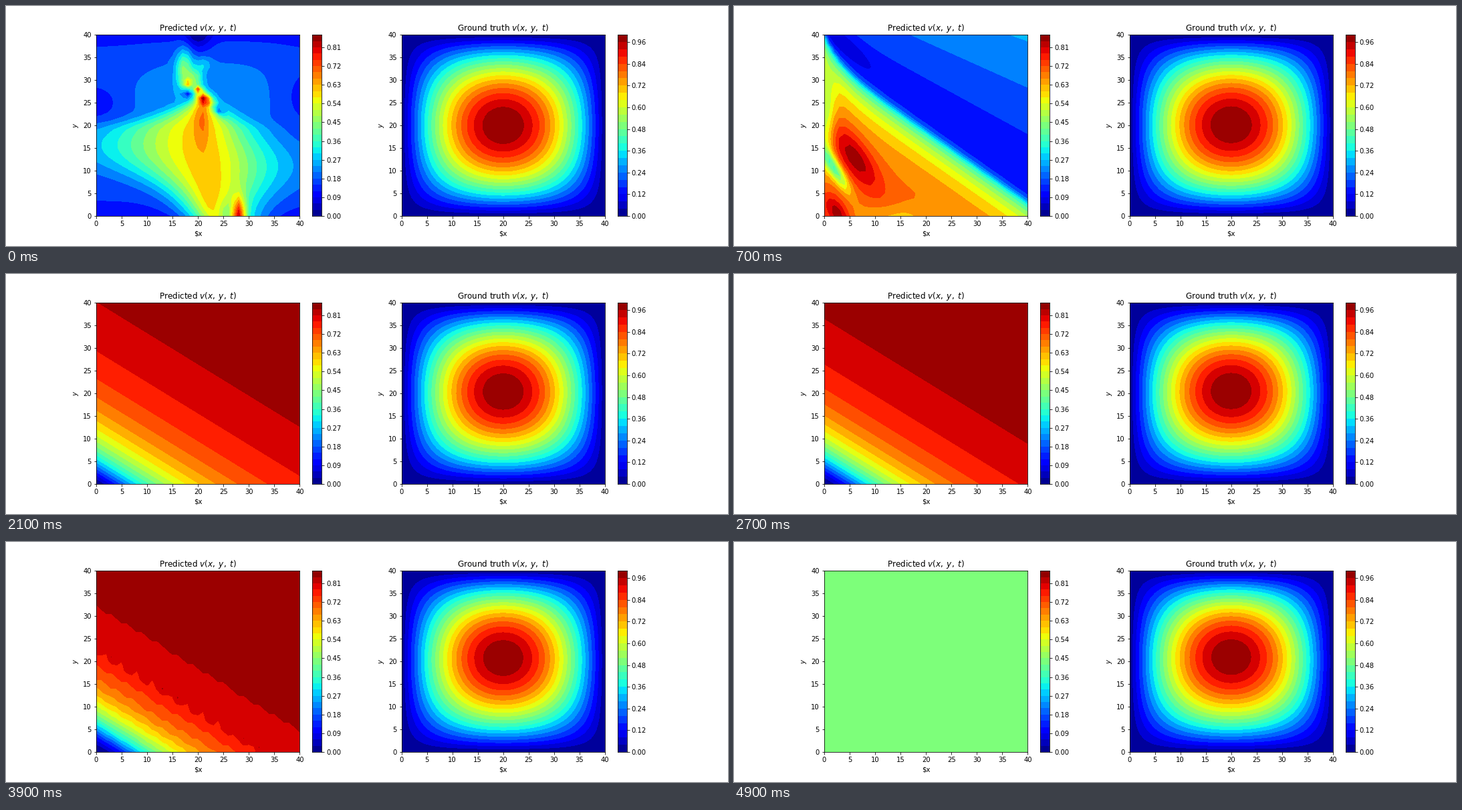
Animation of 1080 by 360 pixels, one loop 5000 ms. Source, as a matplotlib script:

```python
import numpy as np
import matplotlib.pyplot as plt
from matplotlib.animation import FuncAnimation

plt.rcParams.update({"font.family": "DejaVu Sans", "font.size": 10})

FRAMES, STEP = 50, 100
SIDE = 40
X, Y = np.meshgrid(np.arange(SIDE + 1.0), np.arange(SIDE + 1.0))
S = Y + 0.69 * X  # coordinate across the slanted bands


def bump(x0, y0, sx, sy, deg=0):
    a = np.radians(deg)
    u = (X - x0) * np.cos(a) + (Y - y0) * np.sin(a)
    w = -(X - x0) * np.sin(a) + (Y - y0) * np.cos(a)
    return np.exp(-(u / sx) ** 2 - (w / sy) ** 2)


def hill(s, half, power):
    r = (np.clip(s, 0, None) / half) ** power
    return r / (1 + r)


def rescale(v):
    return (v - v.min()) / np.ptp(v)


def plume():
    """A bell-shaped plume under a small turbulent tip."""
    air = (.18 - .07 * np.exp(-Y / 4) - .06 * np.exp((Y - SIDE) / 4)
           + .05 * bump(15, 26, 9, 9) + .05 * bump(28, 26, 11, 10)
           - .06 * bump(0, 25, 5, 4) - .06 * bump(41, 26, 6, 7))
    d = X - 21 - 3 * np.exp(-Y / 6)
    wide = np.where(d < 0, 5 + 12 * np.exp(-((Y - 15.5) / 8) ** 2),
                    6 + 6 * np.exp(-((Y - 11) / 8) ** 2))
    wide = wide * np.clip((27.5 - Y) / 8, .15, 1)
    fade = 1 / (1 + np.exp((Y - 26.2) / .7))
    v = air + (.64 - air) * np.exp(-np.abs(d / wide) ** 1.7) * fade

    v += .08 * bump(20.6, 21, 1.3, 5) + .42 * bump(21.2, 26, 1.8, 1.1, -30)
    v += .42 * bump(28, 0, 1.2, 4) - .14 * bump(25.5, 0, 2.2, 3.5)
    v += .26 * bump(17.3, 32.5, 1.5, 4.2) + .2 * bump(19.5, 30.5, 1.3, 2)
    v += .3 * bump(18, 29.3, .9, .9) + .42 * bump(20, 28, .8, .8)
    v += .1 * bump(21, 33.5, 1.5, 1.5) - .16 * bump(20, 41, 2.5, 4)
    v -= .2 * bump(18, 27, 1, .8) + .25 * bump(24, 23.2, 1.5, .8, -45)
    return np.clip(v, 0, .88)


def front():
    """A steep diagonal front with a hot core behind it."""
    p = Y - (33.8 - .785 * X + 5.5 * np.exp(-X / 3))
    ahead, behind = np.clip(p, 0, None), np.clip(p, None, 0)
    v = np.where(p > 0,
                 .073 + .0086 * ahead / (1 + .019 * X) + .277 * np.exp(-ahead / 1.5),
                 .35 + .37 * (1 - np.exp(behind / 5)))
    v += .17 * bump(6, 13, 8.5, 2.9, -60) + .17 * bump(2.6, .5, 4.5, 1.8, -62)
    v -= .33 * bump(2, 10.5, 5.5, 1.3, -62) + .24 * bump(0, 22, 2, 10)
    v -= .08 * bump(14, 0, 8, 2.5) + .07 * bump(4, 38, 7, 1.8, -45)
    return np.clip(v, 0, .88)


KEYS = [0, 7, 14, 21, 33]
FIELDS = [plume(), front(),
          .9 * hill(S - 8, 13.3, 1.6) + np.exp(-S / 2.3),
          rescale(hill(S, 8.8, 1.5)),
          rescale(hill(S, 8.5, 2))]


def predicted(n):
    """Blend the key fields; late on, rounding error takes over until all is flat."""
    k = min(np.searchsorted(KEYS, n, side="right"), len(KEYS) - 1)
    a = min((n - KEYS[k - 1]) / (KEYS[k] - KEYS[k - 1]), 1)
    v = (1 - a) * FIELDS[k - 1] + a * FIELDS[k]
    if n > 28:
        grain = .02 * (1.5 if n > 39 else 1.22) ** (n - 39)
        v = np.round(v / grain) * grain if grain < .7 else np.full_like(v, .5)
        # beads of rounding error along one band
        glow = np.exp(-((n - 39) / 2) ** 2 - (S - 22.7) ** 2)
        v += .03 * glow * (1 + np.cos(2 * np.pi * X / 3.2))
    return v


def truth(n):
    """Bell carried upward by its own speed, solved by fixed-point iteration."""
    t = n / (FRAMES - 1)
    amp = (1 - .004 * t) * np.sin(np.pi * X / SIDE)
    v = np.zeros_like(X)
    for _ in range(12):
        v = amp * np.sin(np.pi * (Y - v * t) / SIDE)
    return np.clip(v, 0, 1)


fig = plt.figure(figsize=(15, 5), dpi=72, facecolor="white")
CELL = .775 / 2.2


def panel(col, name, count, step):
    x0 = .125 + col * 1.2 * CELL
    ax = fig.add_axes([x0, .125, .8 * CELL, .755])
    ax.set(xlim=(0, SIDE), ylim=(0, SIDE), xlabel=r"\$x", ylabel="$y$",
           xticks=range(0, 41, 5), yticks=range(0, 41, 5))
    ax.set_title(name + r" $v(x,\;y,\;t)$", fontsize=12)

    bar = fig.add_axes([x0 + .85 * CELL, .125, .755 / 60, .755])
    top = count * step
    edges = np.linspace(0, top, count + 1)
    mids = (edges[:-1] + edges[1:]) / 2
    bar.pcolormesh([0, 1], edges, mids[:, None], cmap="jet", vmin=0, vmax=top)
    bar.set(xlim=(0, 1), ylim=(0, top), xticks=[])
    ticks = np.arange(0, count, 3) * step
    bar.set_yticks(ticks, [f"{v:.2f}" for v in ticks])
    bar.yaxis.tick_right()
    return ax


left = panel(0, "Predicted", 29, .03)
right = panel(1, "Ground truth", 25, .04)
drawn = []


def clear():
    while drawn:
        drawn.pop().remove()
    return []


def fill(ax, v):
    """Bands of 0.05 up to the peak, or a single band for a flat field."""
    count = np.ceil(np.round(v.max() * 20, 6))
    levels = np.arange(count + 1) / 20 if np.ptp(v) > .01 else [0, 1]
    drawn.append(ax.contourf(X, Y, v, levels=levels, cmap="jet",
                             vmin=0, vmax=levels[-1]))


def update(n):
    clear()
    fill(left, predicted(n))
    fill(right, truth(n))
    return drawn


anim = FuncAnimation(fig, update, frames=FRAMES, init_func=clear,
                     interval=STEP, repeat=True, repeat_delay=0)
plt.show()
```
